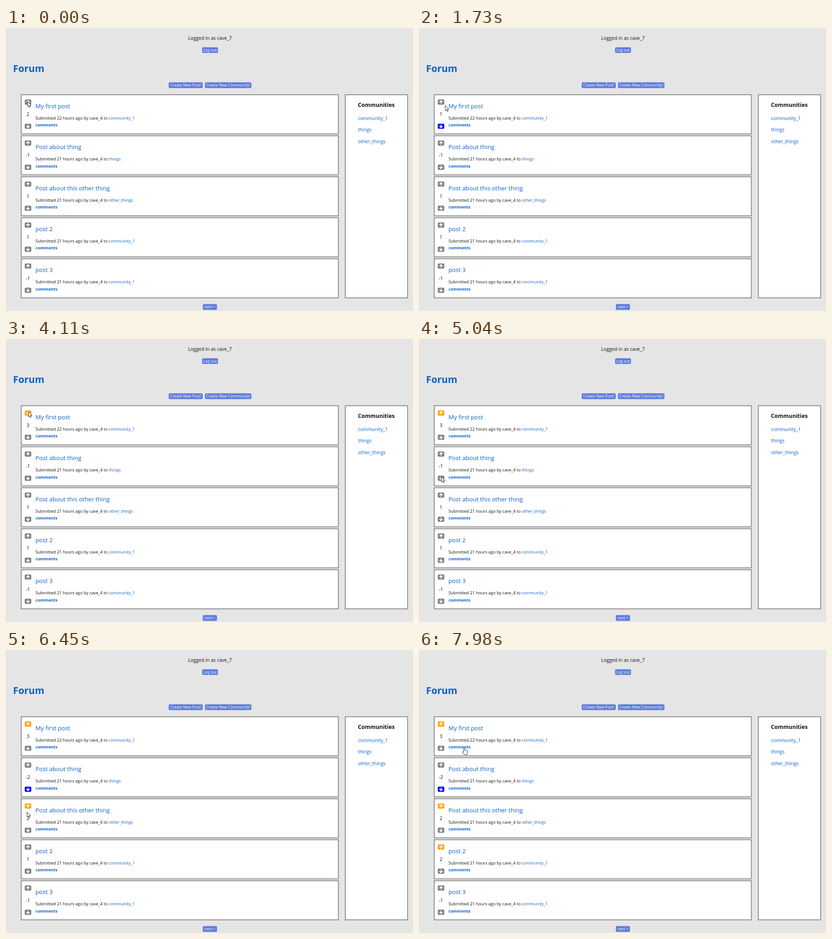
An HTML page that plays this animation: 898 by 624 pixels, repeating every 8 s.

```html
<!DOCTYPE html>
<html lang="en">
<head>
<meta charset="utf-8">
<title>Forum</title>
<style>
  html, body { margin: 0; width: 100%; height: 100%; overflow: hidden; background: #e5e5e5; }
  svg { display: block; width: 898px; height: 624px; font-family: "Open Sans", "Noto Sans", sans-serif; }
  text { fill: #111; white-space: pre; }
  .mid { text-anchor: middle; }
  .bold { font-weight: 700; }
  .link { fill: #0a61c8; }
  .label { fill: #fff; font-size: 8.6px; text-anchor: middle; }
  .button { fill: #5c7bdc; }
  .panel { fill: #fff; stroke: #808080; stroke-width: 1.7; }
  .arrow { fill: none; stroke: #fff; stroke-width: 1.8; }
  .pointer { fill: #fff; stroke: #000; stroke-width: .85; stroke-linejoin: round; }
</style>
</head>
<body>
<svg id="stage" viewBox="0 0 898 624"></svg>
<script>
const stage = document.getElementById("stage");
const LOOP = 8000, TICK = 66.5, TICK_SHIFT = 20;
const ROW_PITCH = 90.4;
const GREY = "#808080", ORANGE = "#ffa500", BLUE = "#0000ff";

const posts = [
  { title: "My first post", age: 22, community: "community_1", score: 2 },
  { title: "Post about thing", age: 21, community: "things", score: -1 },
  { title: "Post about this other thing", age: 21, community: "other_things", score: 1 },
  { title: "post 2", age: 21, community: "community_1", score: 1 },
  { title: "post 3", age: 21, community: "community_1", score: -1 },
];

// [tick, post, own vote]
const votes = [[6, 0, 1], [22, 0, -1], [37, 0, 1], [48, 0, 0], [62, 0, 1],
               [82, 1, -1], [95, 2, 1], [110, 3, 1]];

// [first tick, end tick] of the click highlight
const clicks = [[2, 4], [18, 20], [33, 35], [45, 47], [59, 61], [78, 80], [92, 93], [106, 108]];

// [tick, x, y] of the pointer tip
const path = [
  [0, 47.5, 162], [10, 47.5, 162], [13, 48, 192], [15, 48, 213], [17, 48, 213], [18, 47.8, 214.5],
  [22, 47.8, 214.5], [26, 58, 171], [30, 50, 160], [32, 48, 158.8], [40, 48, 158.8],
  [42, 48.7, 159.2], [53, 48.7, 159.2], [54, 50, 161], [56, 49.5, 160.3], [65, 49.5, 160.3],
  [71, 56.5, 232], [76, 49.5, 304], [78, 48, 309], [83, 48, 309], [90, 44.5, 341.8],
  [95, 44.5, 341.8], [97, 46.5, 357.5], [102, 51, 410], [105, 48, 436.5], [110, 48, 436.5],
  [115, 66, 335], [120, 100, 216],
];

function add(tag, attributes, content = "", parent = stage) {
  const node = document.createElementNS("http://www.w3.org/2000/svg", tag);
  for (const name in attributes) node.setAttribute(name, attributes[name]);
  node.textContent = content;
  return parent.appendChild(node);
}
const write = (content, x, y, size, style = "") =>
  add("text", { x, y, "font-size": size, class: style }, content);
const panel = (x, y, width, height) => add("rect", { x, y, width, height, class: "panel" });

function button(label, x, y, width) {
  add("rect", { x, y, width, height: 12.6, rx: 2.5, class: "button" });
  add("text", { x: x + width / 2, y: y + 9.5, class: "label" }, label);
}

function voteButton(y, direction) {
  const group = add("g", { transform: `translate(48.6 ${y}) scale(1 ${direction})` });
  const face = add("rect", { x: -7.2, y: -5.7, width: 14.4, height: 11.4, rx: 2.8 }, "", group);
  add("path", { d: "M0 3.8V-2.8M-3.7 .5L0 -3.1L3.7 .5", class: "arrow" }, "", group);
  return face;
}

write("Logged in as cave_7", 450, 26.4, 10.5, "mid");
button("Log out", 432.7, 42.4, 35);
write("Forum", 15.5, 97, 21.2, "bold link");
button("Create New Post!", 359, 119.8, 75);
button("Create New Community!", 439, 119.8, 102.5);
button("next >", 434.3, 608.8, 31.2);

for (const [row, post] of posts.entries()) {
  const y = row * ROW_PITCH;
  panel(33.6, 147.2 + y, 699.8, 86.2);
  post.up = voteButton(163.3 + y, 1);
  post.down = voteButton(216.6 + y, -1);
  post.counter = write("", 48.4, 194 + y, 10.4, "mid");
  write(post.title, 65, 176.8 + y, 13.2, "link");
  write(`Submitted ${post.age} hours ago by cave_4 to`, 65, 201.8 + y, 9.3);
  write(post.community, 227, 201.8 + y, 9.1, "link");
  write("comments", 65.2, 217.2 + y, 9.2, "bold link");
}

panel(748.6, 147.2, 137.6, 447.8);
write("Communities", 776.6, 174.4, 12.15, "bold");
["community_1", "things", "other_things"].forEach((name, i) =>
  write(name, 776.8, 202.5 + i * 25.8, 10.4, "link"));

const highlight = add("circle", { r: 8.5, fill: "#ffee10", opacity: .65 });
const arrow = add("path", { class: "pointer", d: "M0 0V11.4L2.6 9L4.4 13L6.2 12.2L4.5 8.3H8Z" });
const hand = add("path", { class: "pointer",
  d: "M-1.3 1Q0 -1 1.2 1V5Q2.5 4 3.4 5.4Q4.7 4.7 5.6 6Q7.4 5.6 7.5 7.4V10L5.9 14.4H-.4L-3.6 9.6Q-4 7.5 -2.3 8L-1.3 9Z" });

function pointerAt(tick) {
  const next = path.findIndex(key => key[0] >= tick);
  if (next <= 0) return path[0].slice(1);
  const [t0, x0, y0] = path[next - 1], [t1, x1, y1] = path[next];
  const k = (tick - t0) / (t1 - t0);
  return [x0 + (x1 - x0) * k, y0 + (y1 - y0) * k];
}

function draw(time) {
  const tick = Math.min(120, Math.floor((time % LOOP + TICK_SHIFT) / TICK));

  posts.forEach((post, row) => {
    const cast = votes.filter(([at, target]) => target === row && at <= tick).pop();
    const own = cast ? cast[2] : 0;
    post.counter.textContent = post.score + own;
    post.up.setAttribute("fill", own > 0 ? ORANGE : GREY);
    post.down.setAttribute("fill", own < 0 ? BLUE : GREY);
  });

  const place = `translate(${pointerAt(tick)})`;
  for (const node of [highlight, arrow, hand]) node.setAttribute("transform", place);
  const show = (node, visible) => node.setAttribute("visibility", visible ? "visible" : "hidden");
  const overLink = tick >= 119;
  show(highlight, clicks.some(([from, to]) => tick >= from && tick < to));
  show(arrow, !overLink);
  show(hand, overLink);
}

const start = performance.now();
function frame() {
  draw(performance.now() - start);
  requestAnimationFrame(frame);
}
frame();
</script>
</body>
</html>
```
